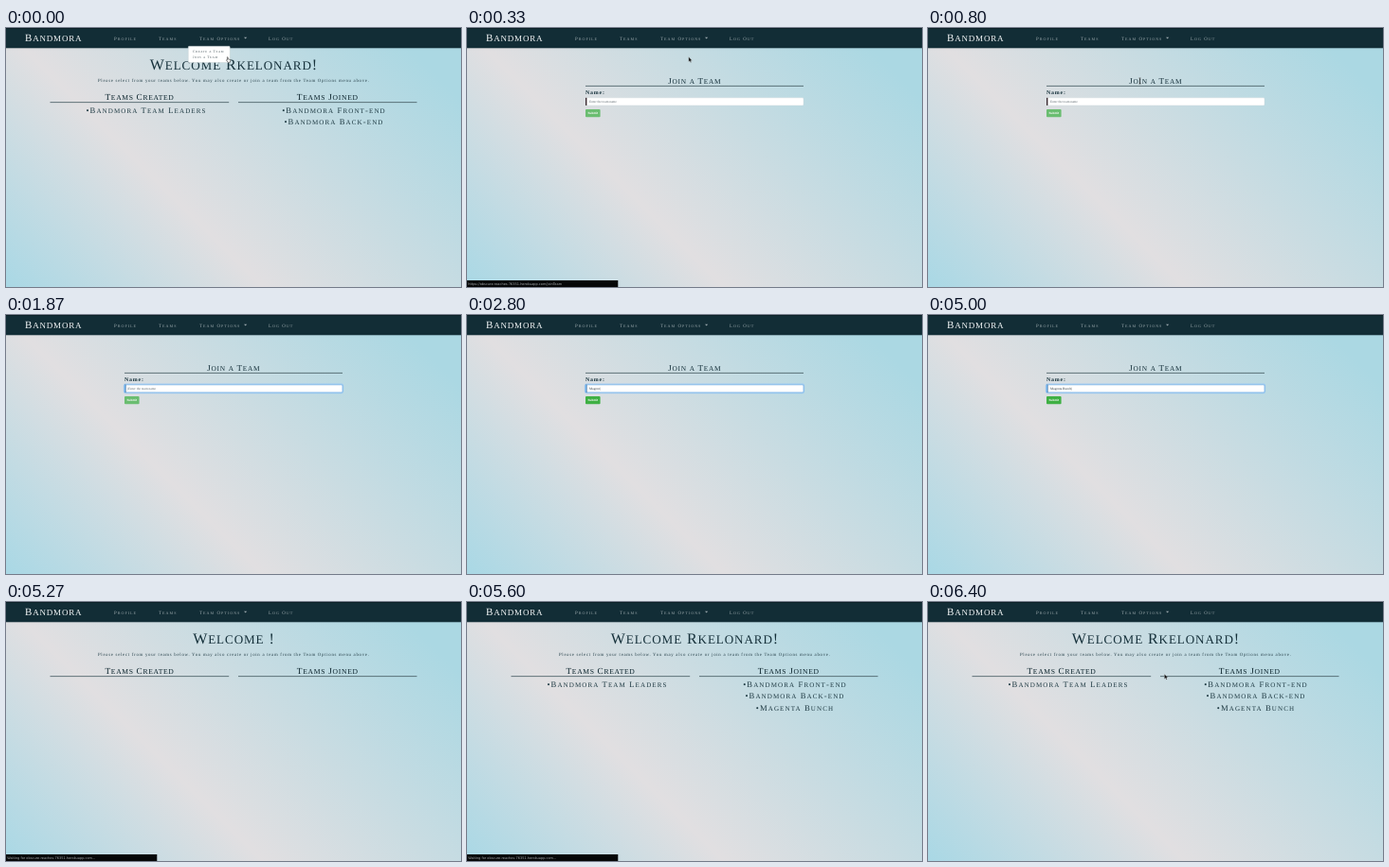
Recreate the animation shown at these times as an HTML page. Size 480 by 274 pixels, loop 6.47 s.

```html
<!DOCTYPE html>
<html lang="en">
<head>
<meta charset="utf-8">
<title>Join a team</title>
<style>
html, body { margin: 0; width: 100%; height: 100%; overflow: hidden; }
svg {
  display: block; width: 480px; height: 274px;
  background: linear-gradient(45deg, #a9d8e5, #e1dfe1 36%, #abd8e3 90%);
  font-family: "Liberation Serif", serif; text-rendering: geometricPrecision;
}
.sans { font-family: "Liberation Sans", sans-serif; font-weight: bold; }
.status { font-family: "DejaVu Sans", sans-serif; }
</style>
</head>
<body>
<svg id="stage" viewBox="0 0 480 274"></svg>
<script>
const LOOP = 6470, TICK = 1000 / 15;
const INK = '#15303a';
const BRAND = 'Bandmora', USER = 'Rkelonard', TEAM = 'Magenta Bunch';
const HOST = 'obscure-reaches-76351.herokuapp.com';
const KEYS = [2000, 2330, 2470, 2600, 2730, 2800, 2930, 3200, 3730, 4070, 4330, 4530, 5000];
const stage = document.getElementById('stage');

const rect = (x, y, w, h, fill, more = '') =>
  `<rect x="${x}" y="${y}" width="${w}" height="${h}" fill="${fill}" ${more}/>`;
const text = (str, x, y, size, gap, fill, more = '') =>
  `<text x="${x}" y="${y}" font-size="${size}" letter-spacing="${gap}" fill="${fill}" ${more}>${str}</text>`;

// Lower-case letters become slightly smaller capitals.
const caps = (str, ...rest) => text(str.replace(/[a-z]+/g,
  s => `<tspan font-size=".82em">${s.toUpperCase()}</tspan>`), ...rest);
const MID = 'text-anchor="middle"';

function navbar() {
  const links = [['Profile', 114], ['Teams', 161], ['Team Options', 204], ['Log Out', 277]];
  return rect(0, 0, 480, 21.3, '#122d36') + rect(0, 0, 480, .8, '#0a1d24') +
    caps(BRAND, 20, 14.2, 11, .8, '#f4f7f8') +
    links.map(([s, x]) => caps(s, x, 12.6, 5, 1, '#9daaae')).join('') +
    '<path d="M251 9.7h3.2l-1.6 1.7z" fill="#9daaae"/>';
}

function home(loaded, joined) {
  const item = (s, x, y) => caps('•' + s, x, y, 8.6, 1.1, '#1f3a43', MID);
  let out = caps(`Welcome ${loaded ? USER : ' '}!`, 240.4, 44, 16, .9, INK, MID) +
    text('Please select from your teams below. You may also create or join a team from the Team Options menu above.',
      240.3, 56.5, 4.8, .73, '#27414a', MID) +
    caps('Teams Created', 141, 76.2, 9.3, .65, '#0c242d', MID) +
    caps('Teams Joined', 339.3, 76.2, 9.3, .7, '#0c242d', MID) +
    rect(46.5, 78.3, 188.7, .8, '#42575e') + rect(245, 78.3, 188.5, .8, '#42575e');
  if (loaded) {
    out += item(BRAND + ' Team Leaders', 148, 89.7) +
      item(BRAND + ' Front-end', 346, 89.7) + item(BRAND + ' Back-end', 346, 102.2);
    if (joined) out += item(TEAM, 346, 114.6);
  }
  return out;
}

function menu() {
  return rect(192.3, 19.3, 43.9, 17.2, '#fff', 'rx=".8" stroke="#c3cdd0" stroke-width=".4"') +
    caps('Create a Team', 197, 26.1, 3.8, .58, '#4c5a60') +
    caps('Join a Team', 197, 32.4, 3.8, .58, '#4c5a60');
}

function form(t) {
  const focus = Math.max(0, Math.min(1, (t - 1400) / 150));
  const typed = TEAM.slice(0, KEYS.filter(k => t >= k).length);
  const caret = focus ? '<tspan fill="#111">|</tspan>' : '';
  return caps('Join a Team', 240.3, 59, 9, .7, INK, MID) +
    rect(125, 60.9, 230, .8, '#42575e') +
    text('Name:', 125, 69.6, 5.9, .8, INK, 'font-weight="bold"') +
    rect(124.6, 73.3, 230.8, 9.1, 'none', `rx="1.4" stroke="#80bdff" stroke-width="1.5" opacity="${focus * .55}"`) +
    rect(125, 73.8, 230, 8.1, '#fff', 'rx="1" stroke="#cbd5da" stroke-width=".4"') +
    rect(125, 73.8, 230, 8.1, 'none', `rx="1" stroke="#62a8e8" stroke-width=".6" opacity="${focus}"`) +
    rect(125, 73.8, 1.4, 8.1, '#3a2a30') +
    rect(125, 73.8, 1.4, 8.1, '#69aeea', `opacity="${focus}"`) +
    (typed ? text(typed + caret, 129, 79.1, 3.5, 0, '#303a40')
           : text(caret + 'Enter the team name', focus ? 128.5 : 129, 79.1, 3.5, 0, '#59646b')) +
    `<g opacity="${typed ? 1 : .72}">` + rect(125, 86, 15.6, 8.2, '#3fb044', 'rx=".9"') + '</g>' +
    text('Submit', 132.8, 91.2, 3.1, 0, '#fff', MID + ' class="sans"');
}

const status = str => rect(0, 267, 159.3, 7, '#050607') +
  text(str, 1.2, 271.7, 3.5, 0, '#a9adaf', 'class="status"');

const SHAPES = {
  arrow: '<path d="M0 0v5.2l1.2-1 .8 1.8.9-.4-.8-1.7h1.6z" fill="#111" stroke="#e8eef0" stroke-width=".3"/>',
  hand: '<path d="M.4 0q.6-.3.8.4v1.7l2.1.5q.7.3.5 1.1l-.5 1.8H1.2L-.5 3.3q0-.7.9-.2z" fill="#fff" stroke="#222" stroke-width=".55"/>',
  beam: '<path d="M-1-3h2M0-3v6M-1 3h2" fill="none" stroke="#222" stroke-width=".6"/>'
};
const pointer = (shape, x, y) => `<g transform="translate(${x} ${y})">${SHAPES[shape]}</g>`;

function mouse(t) {
  const q = Math.floor(t / TICK + .05) * TICK;
  const mix = (a, b, from, to) => a + (b - a) * Math.max(0, Math.min(1, (q - from) / (to - from)));
  if (t < 270) return pointer('hand', 233, 30.8);
  if (t < 600) return pointer('arrow', 233.8, 30.6);
  if (t < 1870) {
    const late = t >= 800;
    const x = late ? mix(223.5, 200, 800, 1200) : mix(233.8, 223.5, 600, 800);
    const y = late ? mix(56, 78, 800, 1200) : mix(30.6, 56, 600, 800);
    return pointer(y > 51 ? 'beam' : 'arrow', x, y);
  }
  return t < 5930 ? '' : pointer('arrow', mix(205, 249.4, 5930, 6380), 76.2);
}

function scene(t) {
  const onForm = t >= 270 && t < 5270;
  const done = t >= 5270;
  let out = navbar() + (onForm ? form(t) : home(!done || t >= 5470, done));
  if (t < 270) out += menu();
  if (t >= 270 && t < 600) out += status(`https://${HOST}/joinTeam`);
  if (done && t < 5670) out += status(`Waiting for ${HOST}...`);
  return out + mouse(t);
}

const start = performance.now();
function draw() {
  stage.innerHTML = scene((performance.now() - start) % LOOP);
  requestAnimationFrame(draw);
}
draw();
</script>
</body>
</html>
```
